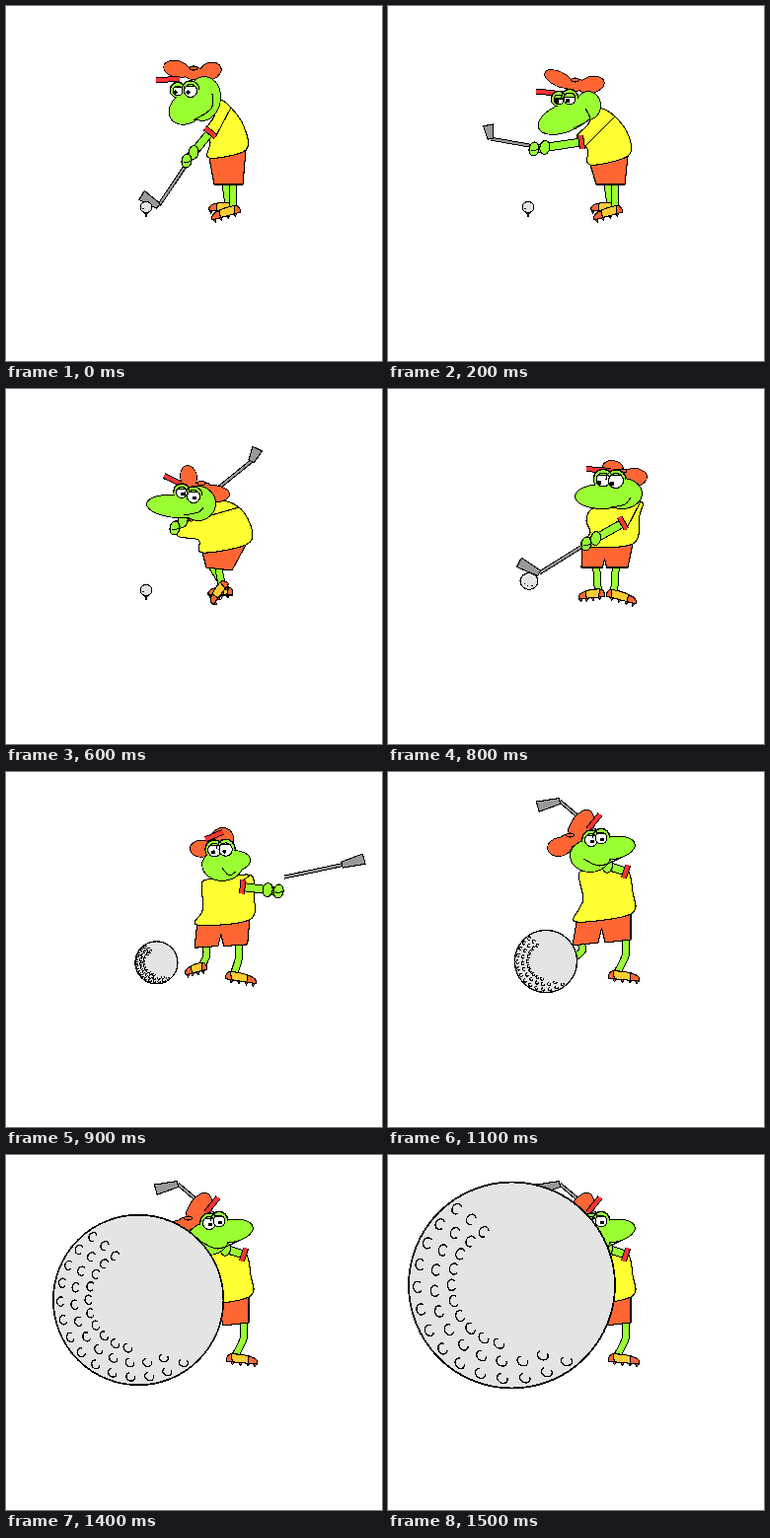
An HTML page that plays this animation: 381 by 360 pixels, repeating every 1600 ms.

```html
<!DOCTYPE html>
<html lang="en">
<head>
<meta charset="utf-8">
<title>Golfing frog</title>
<style>
html, body { margin: 0; width: 100%; height: 100%; overflow: hidden; background: #fff; }
svg { display: block; width: 100vw; height: 100vh; }
</style>
</head>
<body>
<svg id="stage" viewBox="0 0 381 360" shape-rendering="crispEdges" stroke="#000" stroke-linejoin="round" stroke-linecap="round"></svg>
<script>
const GREEN = '#99ff33', ORANGE = '#ff6633', YELLOW = '#ffff33', RED = '#ff3333',
  GOLD = '#ffcc33', GREY = '#999', PALE = '#e4e4e4';
const STEP = 100, STEPS = 16, SHAFT = 60, REACH = 70;

// Key poses. Ellipses are [x, y, rx, ry, turn], eyes [x, y, r],
// legs [hip, ankle, toe], club [angle, loft, head length], ball [x, y, r].
const address = {
  skull: [200, 94, 17, 22, 8], snout: [184, 103, 20, 15, -35],
  eyes: [[174, 86, 5], [187, 86, 6.5]], look: [-2.5, 1.5], lid: .15,
  cap: [[173, 64, 13, 8, 15], [207, 66, 11, 8, -20]], brim: [[152, 75], [176, 74]],
  smile: [[190, 116], [208, 104], [209, 89]],
  shirt: [[216, 95], [228, 103], [241, 122], [243, 146], [206, 154], [207, 138], [203, 125], [211, 112]],
  hem: [[240, 181], [211, 181]], bend: 0,
  legs: [[[222, 178], [226, 204], [206, 203]], [[230, 178], [230, 207], [208, 213]]],
  shoulder: [207, 128], hand: [183, 157], grip: [188, 153], club: [124, 88, 20],
  ball: [142, 204, 6]
};
const takeaway = {
  ...address,
  skull: [203, 101, 12, 14, 0], snout: [180, 113, 29, 14, -22],
  eyes: [[173, 95, 5], [184, 94, 6]], look: [-2, 2], lid: .4,
  cap: [[173, 74, 15, 7, 25], [206, 80, 13, 8, -15]], brim: [[150, 87], [169, 88]],
  smile: [[188, 124], [204, 115], [200, 104]],
  shirt: [[213, 104], [230, 112], [244, 132], [243, 152], [205, 161], [202, 145], [191, 133], [202, 121]],
  shoulder: [196, 138], hand: [148, 145], grip: [163, 145], club: [190, 70, 14]
};
const backswing = {
  ...address,
  skull: [195, 116, 17, 17, 0], snout: [172, 119, 29, 11, 5],
  eyes: [[178, 105, 5.5], [190, 109, 6.5]], look: [1, 1.5],
  cap: [[185, 89, 8, 11, -10], [211, 106, 15, 8, 5]], brim: [[160, 88], [177, 96]],
  smile: [[180, 128], [195, 125], [200, 120]],
  shirt: [[212, 114], [236, 120], [249, 142], [243, 158], [199, 166], [195, 153], [174, 149], [181, 134]],
  hem: [[229, 184], [203, 181]],
  legs: [[[209, 180], [224, 205], [205, 205]], [[215, 180], [219, 200], [207, 216]]],
  shoulder: [185, 128], hand: [171, 141], grip: [202, 111], club: [321, -26, 14]
};
const impact = {
  ...address,
  skull: [237, 106, 20, 15, 0], snout: [217, 109, 27, 12, 0],
  eyes: [[218, 92, 7], [231, 93, 7.5]], look: [-4, 3],
  cap: [[228, 80, 10, 7, 10], [248, 90, 14, 9, -5]], brim: [[201, 81], [226, 83]],
  smile: [[226, 120], [240, 117], [246, 110]],
  shirt: [[222, 120], [256, 114], [255, 128], [248, 157], [197, 159], [205, 146], [201, 134], [206, 122]],
  hem: [[243, 181], [196, 181]],
  legs: [[[211, 178], [213, 207], [193, 209]], [[231, 178], [229, 208], [252, 214]]],
  shoulder: [238, 136], hand: [201, 157], grip: [204, 155], club: [148, 60, 23],
  ball: [143, 195, 9]
};
const finish = {
  ...address,
  skull: [205, 85, 20, 16, 0], snout: [228, 77, 22, 11, -10],
  eyes: [[206, 69, 6.5], [216, 67, 6]], look: [1, 1.5],
  cap: [[174, 76, 12, 9, -10], [195, 56, 10, 19, 30]], brim: [[203, 58], [215, 43]],
  smile: [[238, 86], [215, 95], [198, 88]],
  shirt: [[215, 99], [241, 97], [248, 122], [246, 144], [191, 152], [194, 138], [198, 128], [194, 102]],
  hem: [[246, 170], [187, 176]], bend: 5,
  legs: [[[196, 175], [186, 190], [172, 196]], [[240, 168], [231, 206], [255, 208]]],
  shoulder: [241, 101], hand: [212, 92], grip: [220, 68], club: [-140, -55, 23],
  ball: [160, 192, 31.5]
};
const closeUp = { ...finish, ball: [125.5, 132, 104.5] };

const linear = t => t, easeOut = t => 1 - (1 - t) ** 2;
const keys = [
  { at: 0, pose: address, ease: linear, reach: 0 },
  { at: 2, pose: takeaway, ease: linear, reach: 0 },
  { at: 6, pose: backswing, ease: linear, reach: 0 },
  { at: 8, pose: impact, ease: easeOut, reach: REACH },
  { at: 11, pose: finish, ease: linear, reach: 0 },
  { at: 15, pose: closeUp }
];

function blend(a, b, t) {
  if (typeof a === 'number') return a + (b - a) * t;
  if (Array.isArray(a)) return a.map((v, i) => blend(v, b[i], t));
  return Object.fromEntries(Object.keys(a).map(k => [k, blend(a[k], b[k], t)]));
}

function poseAt(n) {
  const i = Math.max(1, keys.findIndex(k => k.at >= n)), from = keys[i - 1], to = keys[i];
  const u = from.ease((n - from.at) / (to.at - from.at));
  const pose = blend(from.pose, to.pose, u);
  const out = from.reach * Math.sin(Math.PI * u);
  pose.hand[0] += out;
  pose.grip[0] += out;
  return pose;
}

const rad = deg => deg * Math.PI / 180;
const polar = ([x, y], deg, d) => [x + Math.cos(rad(deg)) * d, y + Math.sin(rad(deg)) * d];
const heading = (a, b) => Math.atan2(b[1] - a[1], b[0] - a[0]) * 180 / Math.PI;
const distance = (a, b) => Math.hypot(b[0] - a[0], b[1] - a[1]);

function curve(p, closed) {
  const n = p.length;
  const at = i => closed ? p[(i + n) % n] : p[Math.max(0, Math.min(n - 1, i))];
  let d = 'M' + p[0];
  for (let i = 0; i < (closed ? n : n - 1); i++) {
    const [a, b, c, e] = [at(i - 1), at(i), at(i + 1), at(i + 2)];
    d += `C${b.map((v, k) => v + (c[k] - a[k]) / 6)} ${c.map((v, k) => v - (e[k] - b[k]) / 6)} ${c}`;
  }
  return d + (closed ? 'Z' : '');
}

const path = (d, fill = 'none', w = 1.1) => `<path d="${d}" fill="${fill}" stroke-width="${w}"/>`;
const poly = (p, fill) => path('M' + p.join('L') + 'Z', fill);
const oval = ([x, y, rx, ry = rx, turn = 0], fill, w = 1.1) =>
  `<ellipse rx="${rx}" ry="${ry}" transform="translate(${x},${y}) rotate(${turn})" fill="${fill}" stroke-width="${w}"/>`;

// Several ellipses joined under one outline
const lump = (ovals, fill) => ovals.map(o => oval(o, fill, 1.8)).join('') +
  `<g stroke="none">${ovals.map(o => oval(o, fill)).join('')}</g>`;

const limb = (pts, w, color) => ['#000', color].map((c, i) =>
  `<path d="${curve(pts)}" fill="none" stroke="${c}" stroke-width="${w - 2 * i}" stroke-linecap="butt"/>`).join('');

function shoe(ankle, toe) {
  const heel = blend(ankle, toe, -.3), len = distance(heel, toe);
  const spikes = [.2, .45, .7, .92].map(k => `M${k * len - 1.5},4l1.5,3l1.5,-3`).join('');
  return `<g transform="translate(${heel}) rotate(${heading(heel, toe)}) scale(1,${toe[0] < heel[0] ? -1 : 1})">` +
    path(spikes, ORANGE) +
    path(`M0,4Q-1,-3 4,-4Q${len * .6},-5 ${len * .85},-2Q${len + 1},0 ${len},4Z`, GOLD) +
    path(`M${len * .7},4V-3Q${len + 1},-2 ${len},4Z`, ORANGE) +
    path('M0,4Q-1,-3 4,-4L6,4Z', ORANGE) + '</g>';
}

function leg([hip, ankle, toe], bend) {
  const [x, y] = blend(hip, ankle, .45);
  return limb([hip, [x + bend, y], ankle], 8, GREEN) + shoe(ankle, toe);
}

function shorts({ shirt, hem: [right, left] }) {
  const [x, y] = blend(left, right, .5), notch = Math.max(0, right[0] - left[0] - 30) * .5;
  return poly([shirt[4], shirt[3], right, [x + notch / 4, y], [x, y - notch], [x - notch / 4, y], left], ORANGE);
}

function club(grip, [angle, loft, size]) {
  const neck = polar(grip, angle, SHAFT), face = angle + loft, tip = polar(neck, face, size);
  const side = (p, d) => polar(p, face + 90, d);
  return limb([grip, neck], 4, GREY) +
    poly([side(neck, -3), side(neck, 3), side(tip, 5.5), side(tip, -5)], GREY);
}

function arm({ shirt, shoulder, hand }) {
  const across = heading(shoulder, hand) + 90;
  const cuff = [polar(shoulder, across, -7), polar(shoulder, across, 7)];
  const fist = blend(hand, shoulder, Math.min(1, 11 / distance(hand, shoulder)));
  return path(`M${shirt[1]}L${cuff[1][0] > cuff[0][0] ? cuff[1] : cuff[0]}`) +
    limb([shoulder, hand], 9, GREEN) + limb(cuff, 6, RED) +
    oval([...fist, 5, 7, 10], GREEN) + oval([...hand, 5, 7, 10], GREEN) +
    path(`M${hand[0] - 3},${hand[1] + 1}q3,2 7,-1`);
}

function eye([x, y, r], [dx, dy], lid) {
  const h = r * (2 * lid - 1), w = Math.sqrt(r * r - h * h), b = r + 2.5;
  return oval([x, y, r], '#fff') + oval([x + dx, y + dy, 1.5], '#000') +
    path(`M${x - w},${y + h}A${r},${r} 0 0 1 ${x + w},${y + h}Z`, GREEN) +
    path(`M${x - b},${y - 1}A${b},${b} 0 0 1 ${x + b},${y - 1}`);
}

function head({ cap, brim, skull, snout, eyes, look, lid, smile }) {
  const [x, y] = blend(cap[0], cap[1], .5);
  const brows = eyes.map(([ex, ey, r]) => [ex, ey - 1, r + 2.5]);
  return lump([...cap, [x, y + 3, 10, 6]], ORANGE) + oval([x, y - 2, 4, 2], ORANGE) +
    limb(brim, 6, RED) + lump([...brows, skull, snout], GREEN) +
    eyes.map(e => eye(e, look, lid)).join('') + path(curve(smile));
}

function frog(p) {
  return p.legs.map(l => leg(l, p.bend)).join('') + shorts(p) +
    path(curve(p.shirt, true), YELLOW) + club(p.grip, p.club) + arm(p) + head(p);
}

function dimples(x, y, r) {
  const c = Math.max(1.3, r * .047);
  let out = '';
  for (let ring = 0; ring < 3; ring++) {
    const from = 234 + 4 * ring, to = 54 + 12 * ring * ring, count = 14 - 2 * ring;
    for (let i = 0; i < count; i++) {
      const deg = blend(from, to, i / (count - 1));
      out += `<g transform="translate(${polar([x, y], deg, r * (.91 - .165 * ring))}) rotate(${(deg - 180) * .6})">` +
        path(`M${c * .5},${-c}A${c * .9},${c * 1.15} 0 1 0 ${c * .6},${c * .7}`, 'none', 1 + r / 250) + '</g>';
    }
  }
  return out;
}

function ball([x, y, r]) {
  const big = r > 12;
  const tee = r < 7 ? path(`M${x - 2},${y + 4}h4l-2,6z`, '#333') : '';
  const specks = `M${x - r / 2},${y + r / 4}h0m${r / 3},${r / 4}h0m${r / 2},0h0`;
  return tee + oval([x, y, r, big ? r : r * .93], PALE, 1.1 + r / 150) +
    (big ? dimples(x, y, r) : path(specks));
}

const stage = document.getElementById('stage');
const start = performance.now();
let shown = -1;

function tick() {
  const n = Math.floor((performance.now() - start) / STEP) % STEPS;
  if (n !== shown) {
    const pose = poseAt(n);
    stage.innerHTML = frog(pose) + ball(pose.ball);
    shown = n;
  }
  requestAnimationFrame(tick);
}
tick();
</script>
</body>
</html>
```
